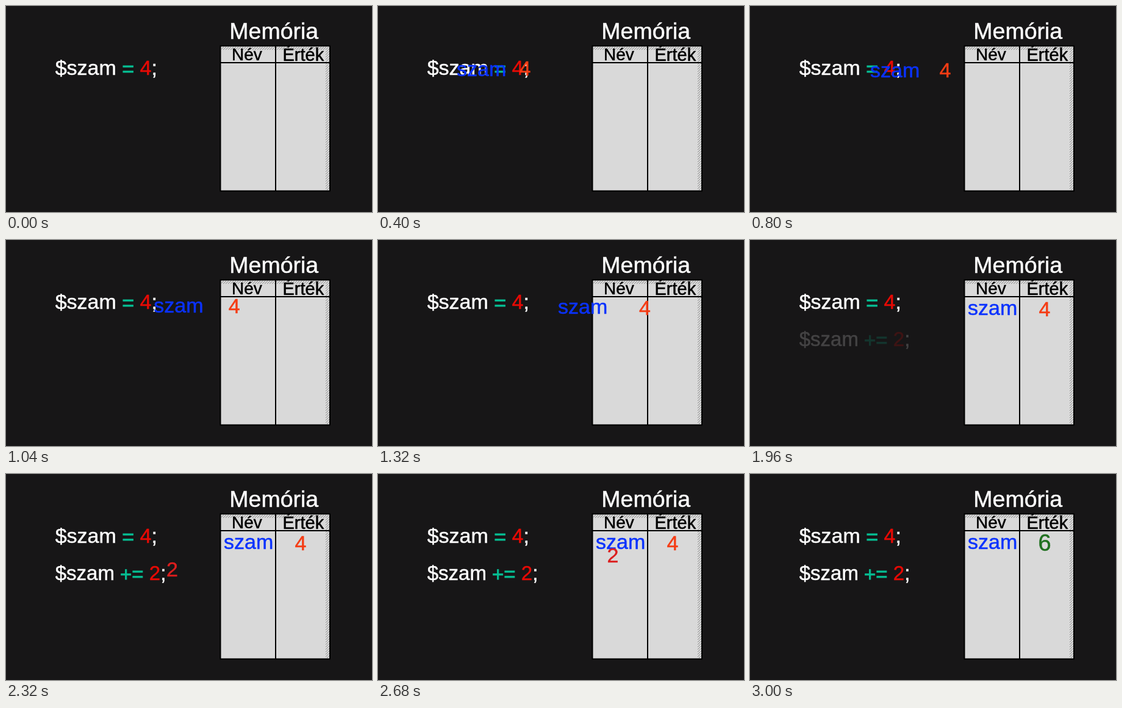
An HTML page that plays this animation: 600x338 px, repeating every 3240 ms.

```html
<!DOCTYPE html>
<html lang="hu">
<head>
<meta charset="utf-8">
<title>Memória</title>
<style>
  html, body { margin: 0; width: 100%; height: 100%; overflow: hidden; background: #171617; }
  svg { display: block; width: 100vw; height: 100vh; }
  text { font: 34px "Liberation Sans", Arial, sans-serif; color: #fff; }
  text, tspan { fill: currentColor; stroke: currentColor; stroke-width: .5px; }
  .op { color: #06bd92; stroke-width: .9px; }
  .num { color: #e60a05; }
  .head { color: #000; }
</style>
</head>
<body>
<svg viewBox="0 0 600 338">
  <defs>
    <pattern id="hatch" width="4" height="4" patternUnits="userSpaceOnUse">
      <path d="M-1 5L5 -1M-1 1L1 -1M3 5L5 3" stroke="#777" stroke-width=".8"/>
    </pattern>
  </defs>

  <rect x="351.5" y="65.5" width="179.5" height="238" fill="#d9d9d9"/>
  <path d="M353 67H530V302H524V72H353Z" fill="url(#hatch)"/>
  <path d="M351.5 65.5H531V303.5H351.5ZM442 66V303M352 93H530" fill="none" stroke="#000" stroke-width="2"/>

  <text x="366.3" y="54" style="font-size:37.5px">Memória</text>
  <text class="head" x="370" y="88.5" style="font-size:28px">Név</text>
  <text class="head" x="453.5" y="90" style="font-size:29px">Érték</text>

  <text x="80.7" y="113">$szam <tspan class="op" dy="1.5">=</tspan> <tspan class="num" dy="-1.5">4</tspan>;</text>
  <text id="addLine" x="80.7" y="174" style="font-size:33px">$szam <tspan class="op" dy="1.5">+=</tspan> <tspan class="num" dy="-1.5">2</tspan>;</text>

  <text id="name" style="color:#0a32ff">szam</text>
  <text id="four" style="color:#f53c14">4</text>
  <text id="two" style="color:#dc1e1e">2</text>
  <text id="six" x="472.5" y="126" style="color:#1f701f;font-size:38px">6</text>
</svg>
<script>
const LOOP = 3240;
const $ = id => document.getElementById(id);
const clamp = v => Math.min(1, Math.max(0, v));
const easeOut = p => 1 - (1 - p) ** 2;
const linear = p => p;

// Each mover follows a straight line; keys are [time, x], and ease shapes the last stretch.
const movers = [
  { el: $("name"), keys: [[240, 98.9], [400, 129], [800, 197], [1320, 295], [1880, 357]],
    y: [113.5, 123], ease: easeOut, until: LOOP },
  { el: $("four"), keys: [[340, 219.5], [400, 231.5], [800, 310.5], [1320, 428], [1720, 473.5]],
    y: [113, 125], ease: easeOut, until: 3000 },
  { el: $("two"), keys: [[2240, 234.5], [2440, 306], [2480, 306], [2960, 473]],
    y: [174, 125], ease: linear, until: 3000 }
];

function xAt(keys, t, ease) {
  const last = keys.length - 1;
  let i = 1;
  while (i < last && t > keys[i][0]) i++;
  const [t0, x0] = keys[i - 1], [t1, x1] = keys[i];
  const p = clamp((t - t0) / (t1 - t0));
  return x0 + (x1 - x0) * (i === last ? ease(p) : p);
}

function show(el, visible) {
  el.style.visibility = visible ? "visible" : "hidden";
}

function draw(t) {
  for (const { el, keys, y, ease, until } of movers) {
    const x = xAt(keys, t, ease);
    const start = keys[0][1], end = keys[keys.length - 1][1];
    el.setAttribute("x", x);
    el.setAttribute("y", y[0] + (y[1] - y[0]) * (x - start) / (end - start));
    show(el, t >= keys[0][0] && t < until);
  }
  $("addLine").style.opacity = clamp((t - 1900) / 320);
  show($("six"), t >= 3000);
}

let origin;
function tick(now) {
  origin ??= now;
  draw((now - origin) % LOOP);
  requestAnimationFrame(tick);
}
draw(0);
requestAnimationFrame(tick);
</script>
</body>
</html>
```
